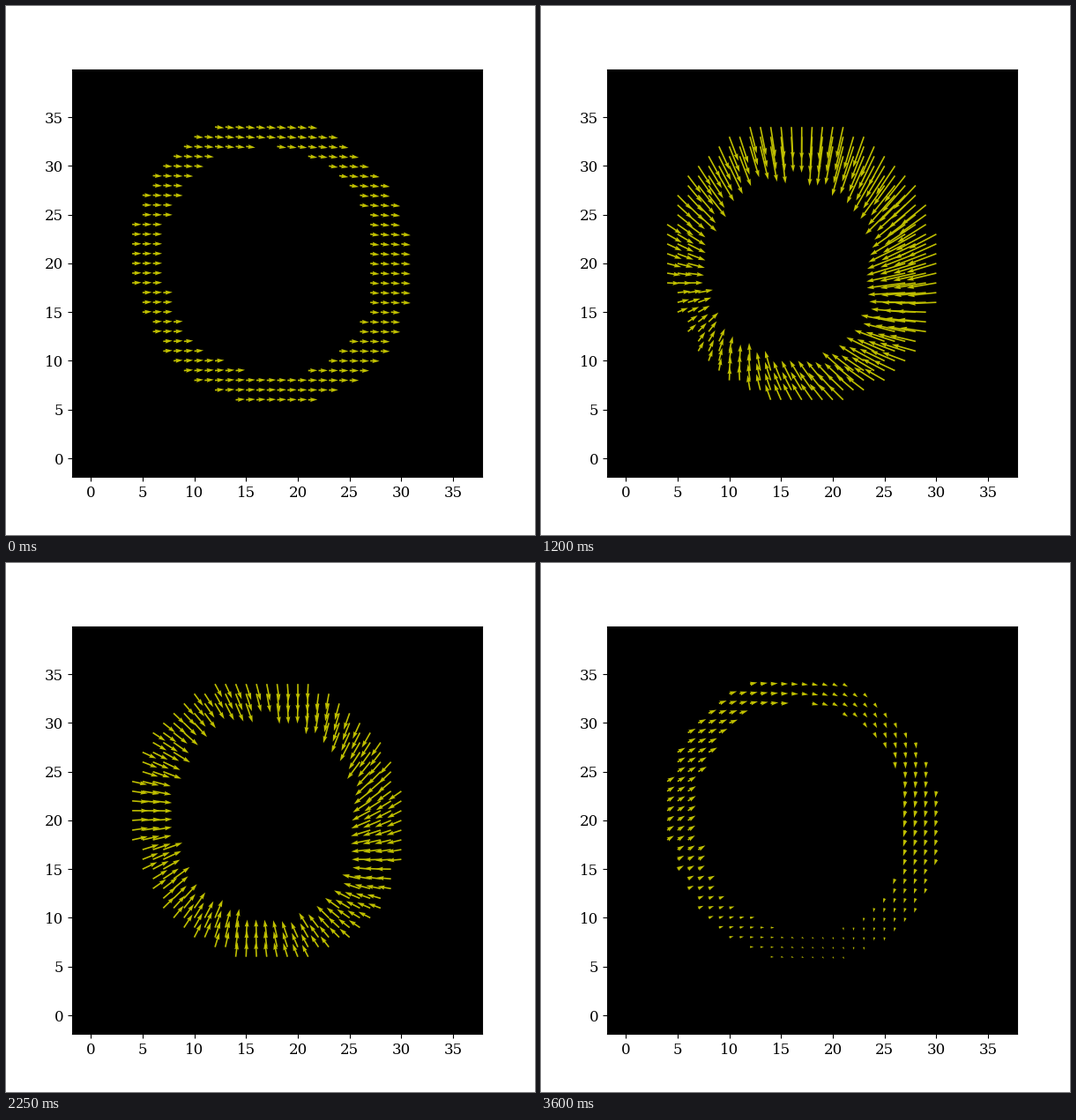
Write a matplotlib script that moves like this. It is 600x600 px and loops after 3750 ms.

```python
import numpy as np
import matplotlib.pyplot as plt
from matplotlib.animation import FuncAnimation

FRAMES, INTERVAL = 25, 150
plt.rcParams.update({"font.family": "DejaVu Serif", "font.size": 12})

# Poses of the beating ring: drift, squeeze and twist, stretch, skew (pixels).
# They weigh the harmonics 0, 1, -1 and 2 of the angle around the ring.
WAVES = np.array([0, 1, -1, 2])
POSES = {
    1: [0, 1.5+4j, 0, 0],
    4: [-3.1-4.4j, -13.1+5.5j, 2.3+.7j, -1.6+.4j],
    6: [-4.9-6j, -22-.5j, 2.2+.8j, -1.5+.8j],
    10: [-9.7-10.8j, -33.4-7j, 2+1.8j, -1.7+1.1j],
    13: [-3.5-5.4j, -29.8-5.4j, 2.7+.2j, -1-.7j],
    17: [5.4+.7j, -6.9-2.2j, -2.6-1.4j, 1.2-.7j],
}
REST = np.array([4.1-1.2j, -2.5-4.5j, -2.7-2j, -.9])
TIMES = np.array([*POSES], float)
KEYS = np.array([*POSES.values()], complex)
SLOPES = np.gradient(KEYS, TIMES, axis=0)


def inside(x, y, cx, cy, a, b, power):
    """Slightly slanted oval."""
    cx = cx - 0.04 * (y - 20)
    return np.abs((x - cx) / a) ** power + np.abs((y - cy) / b) ** power <= 1


def pose(n):
    """Smooth curve through the poses, then a quick settling to rest."""
    if n > TIMES[-1]:
        left = ((FRAMES - 1 - n) / (FRAMES - 1 - TIMES[-1])) ** 5
        return REST + (KEYS[-1] - REST) * left
    i = min(np.searchsorted(TIMES, n, side="right"), len(TIMES) - 1) - 1
    h = TIMES[i + 1] - TIMES[i]
    s = (n - TIMES[i]) / h
    return (KEYS[i] * (1 + 2 * s) * (1 - s) ** 2
            + KEYS[i + 1] * s * s * (3 - 2 * s)
            + h * s * (1 - s) * (SLOPES[i] * (1 - s) - SLOPES[i + 1] * s))


X, Y = (g.ravel() for g in np.meshgrid(np.arange(37), np.arange(39)))
ring = (inside(X, Y, 17.1, 20.15, 13.5, 14.75, 2)
        & ~inside(X, Y, 16.82, 20.3, 10.15, 11.75, 2.1))
X, Y = X[ring], Y[ring]

# Pixel offset of each point from the middle of the ring
OFFSET = (X - 17) * 465 / 39.6 + 1j * (Y - 20) * 462 / 41.8
ANGLE = np.angle(OFFSET)
DEPTH = (141 - np.abs(OFFSET)) / 14
HARMONICS = np.exp(1j * np.outer(ANGLE, WAVES))


def field(n):
    if n == 0:
        return 10.5 - 1j * (0.4 + 1.2 * np.cos(ANGLE - 0.95))
    gain = 0.11 if n < 17 else 0.04
    return HARMONICS @ pose(n) * (1 + gain * DEPTH)


fig = plt.figure(figsize=(6, 6), dpi=100)
ax = fig.add_subplot(facecolor="black")
ax.set(xlim=(-1.8, 37.8), ylim=(-1.9, 39.9),
       xticks=range(0, 36, 5), yticks=range(0, 36, 5))
arrows = ax.quiver(X, Y, np.ones(len(X)), np.zeros(len(X)), color="y",
                   units="dots", width=1.65, scale_units="dots", scale=1)


def draw(n):
    d = field(n)
    arrows.set_UVC(d.real, d.imag)
    return arrows,


anim = FuncAnimation(fig, draw, frames=FRAMES, interval=INTERVAL, repeat=True)
plt.show()
```
